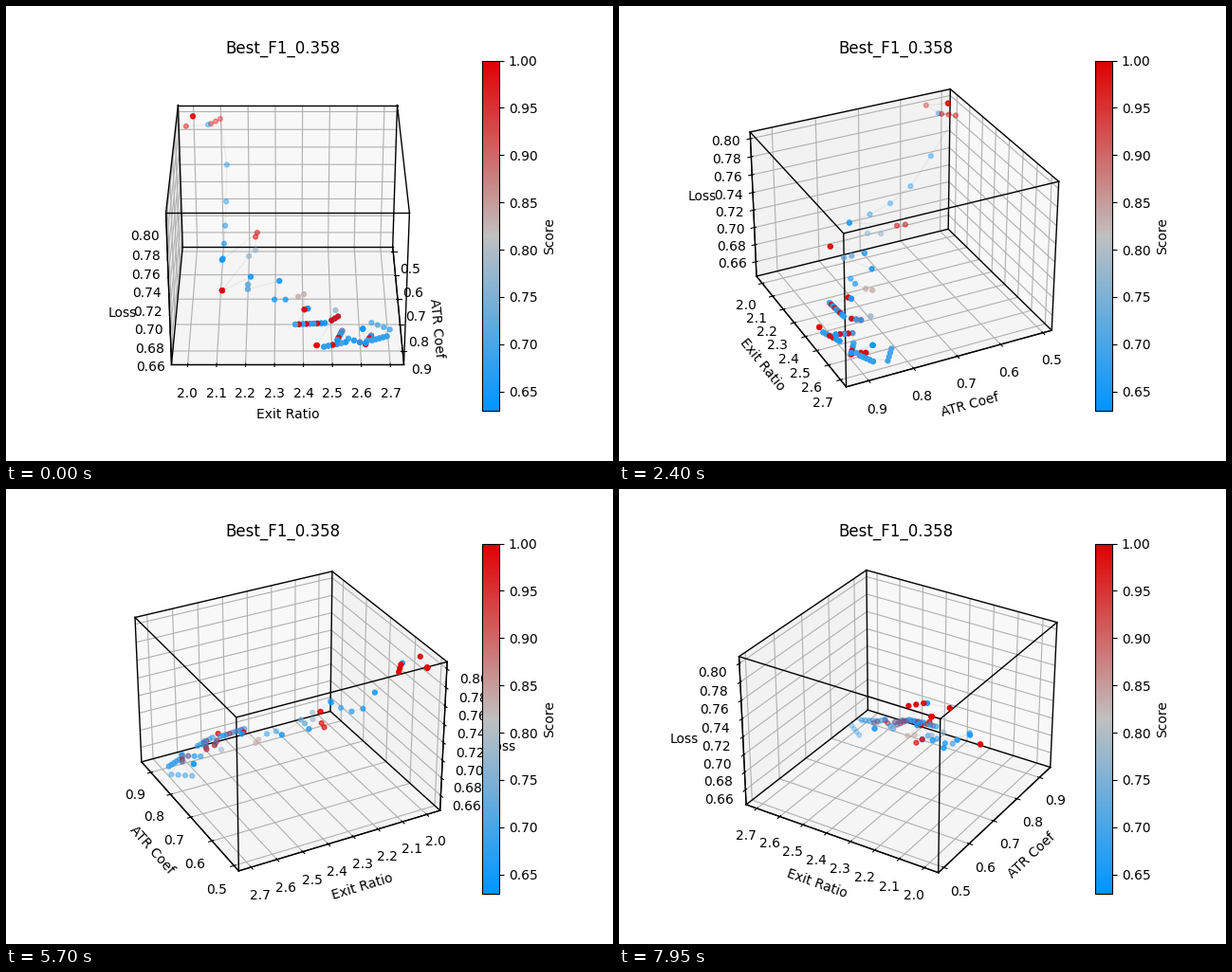
Recreate the animation shown at these times as a matplotlib script. Size 640 by 480 pixels, loop 8 s.

```python
from itertools import combinations, product

import matplotlib.pyplot as plt
import numpy as np
from matplotlib.animation import FuncAnimation
from matplotlib.colors import LinearSegmentedColormap

TICK_MS, LOOP_MS = 50, 8000
TICKS_PER_STEP, DEGREES_PER_STEP = 3, 4

ATR_LIM, EXIT_LIM, LOSS_LIM = (0.479, 0.9493), (1.944, 2.747), (0.6428, 0.8073)
BLUE, GRAY, RED = 0.65, 0.77, 1.0
BEST_SHARE = 0.3

rng = np.random.default_rng(7)


def mixed(count):
    """Mostly low scores with some near-perfect ones among them."""
    best = rng.random(count) < BEST_SHARE
    return np.where(best, RED, rng.uniform(0.64, 0.70, count))


def branch(count, loss, start, end, score=None, visits=1):
    """Trials on a straight line between two (ATR, exit) places."""
    places = np.repeat(np.linspace(start, end, count), visits, axis=0)
    total = len(places)
    scores = mixed(total) if score is None else np.full(total, score)
    return np.column_stack([places, np.full(total, loss), scores])


def descent(count):
    """Even ATR steps while the loss excess halves each time."""
    k = np.arange(count)
    return np.column_stack([0.579 + 0.048 * k, np.full(count, 2.125 - 0.002 * k),
                            0.706 + 0.0585 * 0.5 ** k, np.full(count, BLUE)])


def search_trials():
    def spot(visits, loss, place, score):
        return branch(1, loss, place, place, score, visits)

    return np.vstack([
        spot(5, 0.800, (0.501, 1.999), RED),
        spot(1, 0.800, (0.548, 1.978), RED),
        spot(1, 0.800, (0.541, 2.057), BLUE),
        branch(3, 0.800, (0.537, 2.067), (0.513, 2.100), RED),
        descent(5),
        spot(2, 0.7080, (0.770, 2.114), BLUE),
        branch(2, 0.7120, (0.672, 2.236), (0.690, 2.230), RED),
        branch(2, 0.7074, (0.728, 2.231), (0.753, 2.208), GRAY),
        spot(4, 0.6865, (0.816, 2.115), RED),
        spot(2, 0.6866, (0.762, 2.214), BLUE),
        branch(2, 0.6857, (0.790, 2.205), (0.808, 2.205), 0.73, visits=2),
        spot(2, 0.6850, (0.773, 2.316), BLUE),
        branch(2, 0.6768, (0.818, 2.299), (0.818, 2.338), BLUE),
        branch(2, 0.6765, (0.806, 2.383), (0.796, 2.403), 0.84),
        spot(2, 0.6755, (0.852, 2.404), RED),
        spot(3, 0.6754, (0.848, 2.416), BLUE),
        branch(9, 0.6688, (0.886, 2.372), (0.881, 2.475), visits=2),
        spot(1, 0.6685, (0.831, 2.514), GRAY),
        branch(3, 0.6685, (0.855, 2.522), (0.870, 2.499), visits=2),
        spot(3, 0.6582, (0.929, 2.446), RED),
        branch(6, 0.6560, (0.927, 2.471), (0.910, 2.547), visits=2),
        branch(5, 0.6590, (0.911, 2.518), (0.878, 2.536), visits=2),
        branch(4, 0.6515, (0.882, 2.558), (0.903, 2.617), visits=2),
        spot(4, 0.6538, (0.853, 2.610), BLUE),
        branch(4, 0.6530, (0.903, 2.617), (0.876, 2.638), visits=2),
        branch(4, 0.6509, (0.820, 2.643), (0.846, 2.706), 0.69),
        branch(5, 0.6520, (0.890, 2.640), (0.875, 2.693), 0.68, visits=2),
    ])


def draw_box(ax):
    corners = list(product(ATR_LIM, EXIT_LIM, LOSS_LIM))
    for a, b in combinations(corners, 2):
        if sum(p != q for p, q in zip(a, b)) == 1:
            ax.plot(*zip(a, b), color="black", lw=1)


fig = plt.figure(figsize=(6.4, 4.8), dpi=100)
ax = fig.add_subplot(projection="3d")
atr, exit_ratio, loss, score = search_trials().T

cmap = LinearSegmentedColormap.from_list("score", ["#0095ff", "#c0c0c0", "#e00000"])
dots = ax.scatter(atr, exit_ratio, loss, c=score, cmap=cmap,
                  vmin=0.6295, vmax=1, s=12, lw=1)
ax.plot(atr, exit_ratio, loss, color="gray", alpha=0.1, lw=1)
draw_box(ax)

ax.set(xlim=ATR_LIM, ylim=EXIT_LIM, zlim=LOSS_LIM,
       xticks=np.arange(5, 10) / 10, yticks=np.arange(20, 28) / 10,
       zticks=np.arange(66, 81, 2) / 100,
       xlabel="ATR Coef", ylabel="Exit Ratio", zlabel="Loss",
       title="Best_F1_0.358")
fig.colorbar(dots, ax=ax, label="Score")


def update(tick):
    ax.view_init(elev=30, azim=DEGREES_PER_STEP * (tick // TICKS_PER_STEP))
    return ()


anim = FuncAnimation(fig, update, frames=LOOP_MS // TICK_MS,
                     interval=TICK_MS, repeat=True, repeat_delay=0)
plt.show()
```
